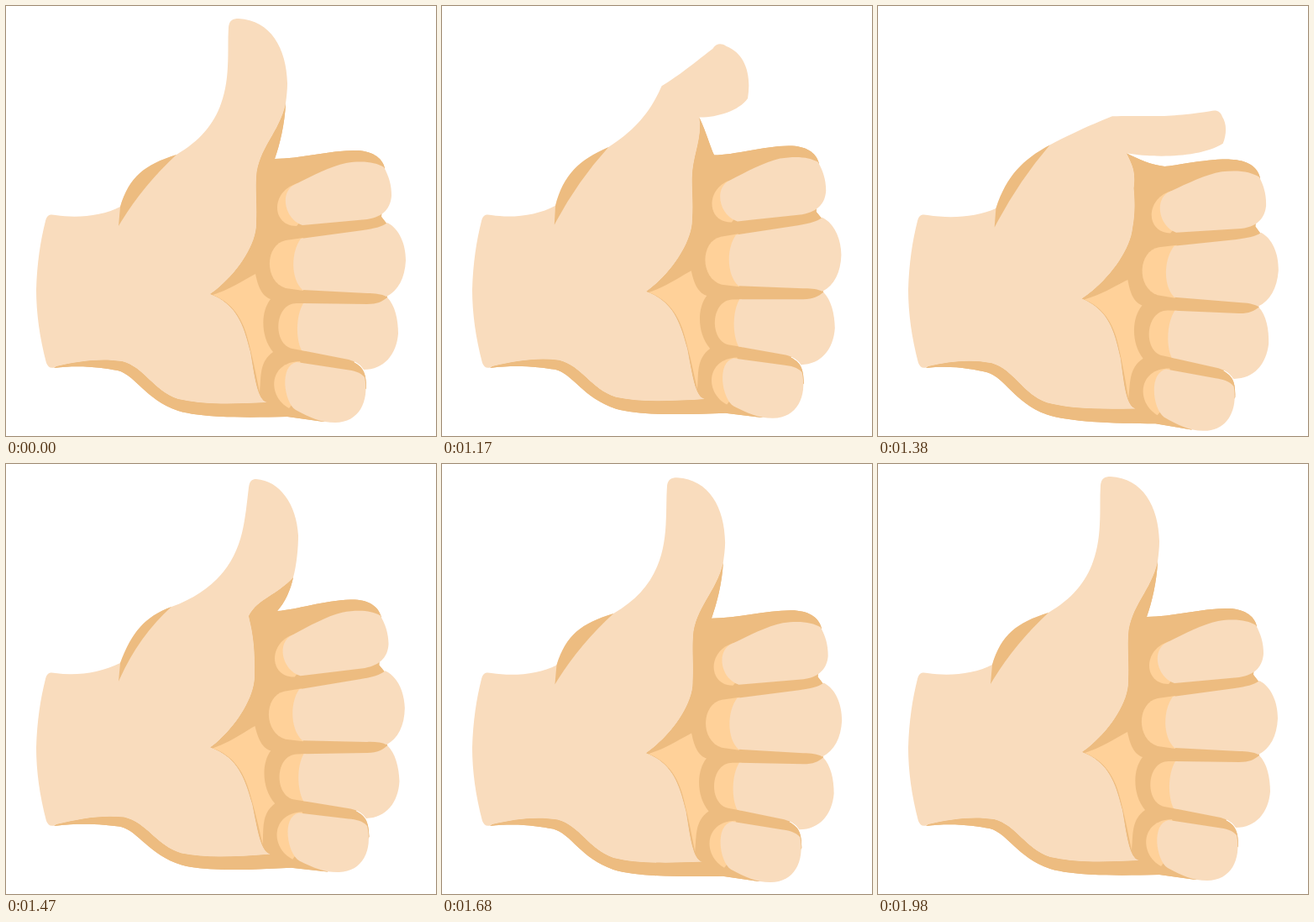
An HTML page for the animation above (2.37 s loop, 512 by 512 pixels).

```html
<!DOCTYPE html>
<html lang="en">
<head>
<meta charset="utf-8">
<title>Thumbs up</title>
<style>
  html, body { margin: 0; width: 100%; height: 100%; overflow: hidden; background: #fff; }
  svg { display: block; width: 100vw; height: 100vh; }
  .skin { fill: #f9dcbd; }
  .shade { fill: #edbc80; }
  .glow { fill: #ffd199; }
</style>
</head>
<body>
<svg id="stage" viewBox="0 0 512 512"></svg>
<script>
const LOOP = 2370, STEP = 30;
const PIVOT = [250, 260], WRIST = [60, 335];

// Hand tilt in radians over time
const TILT = [
  [1020, 0], [1050, -.012], [1110, -.028], [1260, .02], [1335, .045], [1470, -.03],
  [1560, -.061], [1590, -.058], [1710, .017], [1830, .003], [1980, 0]
];

// Thumb poses: outline with curve handles, then the root edge, then the fold at the base
const UP = `136 239  147 203 165 189 203 177  246 152 262 118 264 72  265 55 264 40 265 25
  266 17 270 15 277 15  315 17 334 50 335 92  335 100 334 108 333 116
  326 150 300 170 298 204  297 222 299 235 298 258  332 140 326 165 320 182  161 216 134 262`;
const FIST = `139 240  150 200 170 180 202 160  222 147 246 142 272 142  320 143 335 154 405 151
  413 151 418 155 418 163  418 169 418 175 417 180  380 196 312 192 280 184
  295 193 303 203 304 222  305 235 305 250 303 262  298 187 318 190 342 188  166 208 138 263`;
const RISING = `136 237  150 200 165 182 197 170  247 152 272 120 281 82  285 66 287 45 289 28
  290 20 293 18 298 18  326 20 346 48 348 85  348 100 346 120 342 135
  322 157 300 160 289 181  292 195 297 212 296 250  339 150 332 165 323 175  157 206 134 259`;
const STRETCH = `132 235  138 205 155 184 190 170  222 155 235 125 235 90  234 65 227 40 226 22
  224 12 229 9 236 8  272 4 300 35 308 76  310 85 312 92 313 100
  312 125 290 155 290 180  289 205 294 225 292 250  315 125 314 150 310 166  156 203 130 258`;

// Fixed parts in the resting position
const CUFF = 'M60 429 C54 433 50 430 48 425 C40 395 36 365 36 338 C37 305 41 280 47 256 C49 248 53 248 59 249 C85 253 115 250';
const INNER = 'C299 285 272 323 243 343 C275 355 283 380 291 412 C296 440 299 470 311 472';
const HEM = 'C270 474 235 475 205 468 C175 458 165 430 138 423 C112 419 85 423 60 429Z';
const UNDER = 'M57 431 C90 427 115 431 133 434 C155 440 165 468 205 482 C235 491 290 490 335 489 L378 495 L415 475 L429 455'
  + ' C429 436 425 430 414 424 L435 400 L454 347 L440 300 L454 260 L447 251 L451 193 C448 180 435 172 415 172 C385 172 350 182';
const FIXED = [
  ['glow', 'M246 344 C268 337 285 325 297 319 C301 339 307 346 315 349 C303 364 303 394 318 412 C301 424 304 442 302 460 C298 440 295 425 290 405 C284 376 272 354 246 344Z'],
  ['glow', 'M348 211 C315 219 315 262 346 262 L365 240Z'],
  ['glow', 'M354 276 L333 279 C308 284 307 328 333 336 L354 339Z'],
  ['glow', 'M357 354 L346 354 C319 354 317 403 341 408 L357 411Z'],
  ['glow', 'M350 423 C312 424 311 465 337 479 L360 450Z'],
  ['skin', 'M345 212 C365 202 386 191 405 187 C425 184 440 186 450 192 C456 203 459 213 459 226 C458 240 450 251 430 254 L353 261 C331 254 325 220 345 212Z'],
  ['skin', 'M351 277 L425 267 C438 265 448 263 454 258 C468 265 476 283 476 303 C475 324 467 339 453 346 C447 343 440 342 430 342 L353 338 C339 325 339 293 351 277Z'],
  ['skin', 'M354 354 L430 355 C442 355 448 352 454 347 C463 356 467 373 467 390 C465 415 450 433 426 433 C422 427 418 424 408 421 L352 410 C345 396 345 369 354 354Z'],
  ['skin', 'M346 424 L405 433 C414 434 422 436 427 442 C433 471 420 496 392 496 C375 496 362 490 345 481 C331 472 325 428 346 424Z']
];

const clamp = v => Math.max(0, Math.min(1, v));

// Turns the hand about the wrist while the cuff stays put
function bend([x, y], tilt) {
  const k = clamp((x - 50) / 80);
  const a = tilt * k * k * (3 - 2 * k);
  const dx = x - WRIST[0], dy = y - WRIST[1];
  return [
    WRIST[0] + dx * Math.cos(a) - dy * Math.sin(a),
    WRIST[1] + dx * Math.sin(a) + dy * Math.cos(a)
  ];
}

const show = p => p.map(v => v.toFixed(2)).join(' ');
const bendPath = (d, tilt) =>
  d.replace(/([\d.]+) ([\d.]+)/g, (_, x, y) => show(bend([+x, +y], tilt)));

// Untilts a pose and stores it as angle and radius about the thumb joint
function polar(text, tilt) {
  const n = text.trim().split(/\s+/).map(Number), out = [];
  for (let i = 0; i < n.length; i += 2) {
    const [x, y] = bend([n[i], n[i + 1]], -tilt);
    let a = Math.atan2(y - PIVOT[1], x - PIVOT[0]);
    if (a > 2) a -= 2 * Math.PI;
    out.push(a, Math.hypot(x - PIVOT[0], y - PIVOT[1]));
  }
  return out;
}
const mix = (a, b, k) => a.map((v, i) => v + (b[i] - v) * k);

const up = polar(UP, 0), fist = polar(FIST, .02);
const rising = polar(RISING, -.03), stretch = polar(STRETCH, -.058);
const THUMB = [
  [1030, up], [1110, mix(up, stretch, .1)], [1260, fist], [1335, fist], [1470, rising],
  [1575, stretch], [1710, mix(up, stretch, -.2)], [1830, mix(up, stretch, -.03)], [1980, up]
];
const THUMB_KEYS = up.map((_, i) => THUMB.map(([t, pose]) => [t, pose[i]]));

// Smooth curve through the keys, without overshoot
function at(keys, t) {
  const last = keys.length - 1;
  if (t <= keys[0][0]) return keys[0][1];
  if (t >= keys[last][0]) return keys[last][1];
  const i = keys.findIndex(k => k[0] > t) - 1;
  const slope = j => j < 0 || j >= last ? 0 : (keys[j + 1][1] - keys[j][1]) / (keys[j + 1][0] - keys[j][0]);
  const tangent = j => {
    const a = slope(j - 1), b = slope(j);
    return a * b > 0 ? 2 * a * b / (a + b) : 0;
  };
  const h = keys[i + 1][0] - keys[i][0], u = (t - keys[i][0]) / h, w = 1 - u;
  return keys[i][1] * (1 + 2 * u) * w * w + keys[i + 1][1] * u * u * (3 - 2 * u)
    + h * u * w * (tangent(i) * w - tangent(i + 1) * u);
}

function addPath(cls) {
  const el = document.createElementNS('http://www.w3.org/2000/svg', 'path');
  el.setAttribute('class', cls);
  document.getElementById('stage').append(el);
  return el;
}
const backing = addPath('shade'), palm = addPath('skin');
const shade = addPath('shade'), fold = addPath('shade');
const parts = FIXED.map(([cls, d]) => [addPath(cls), d]);

function draw(t) {
  const tilt = at(TILT, t);
  const v = THUMB_KEYS.map(keys => at(keys, t));
  const p = [];
  for (let i = 0; i < v.length; i += 2) {
    const x = PIVOT[0] + v[i + 1] * Math.cos(v[i]);
    const y = PIVOT[1] + v[i + 1] * Math.sin(v[i]);
    p.push(show(bend([x, y], tilt)));
  }
  const curve = i => ` C${p[i]} ${p[i + 1]} ${p[i + 2]}`;
  const outline = [1, 4, 7, 10, 13, 16, 19, 22].map(curve).join('');
  const edge = bendPath(INNER + ' ' + HEM, tilt);
  const dark = `${bendPath(UNDER, tilt)} ${p[27]} C${p[26]} ${p[25]} ${p[18]}${curve(19)}${curve(22)} ${edge}`;

  backing.setAttribute('d', dark);
  palm.setAttribute('d', `${bendPath(CUFF, tilt)} ${p[0]}${outline} ${edge}`);
  shade.setAttribute('d', dark);
  fold.setAttribute('d', `M${p[0]}${curve(1)} Q${p[28]} ${p[29]}Z`);
  for (const [el, d] of parts) el.setAttribute('d', bendPath(d, tilt));
}

const start = performance.now();
function tick() {
  const t = (performance.now() - start) % LOOP;
  draw(Math.floor(t / STEP) * STEP);
  requestAnimationFrame(tick);
}
tick();
</script>
</body>
</html>
```
